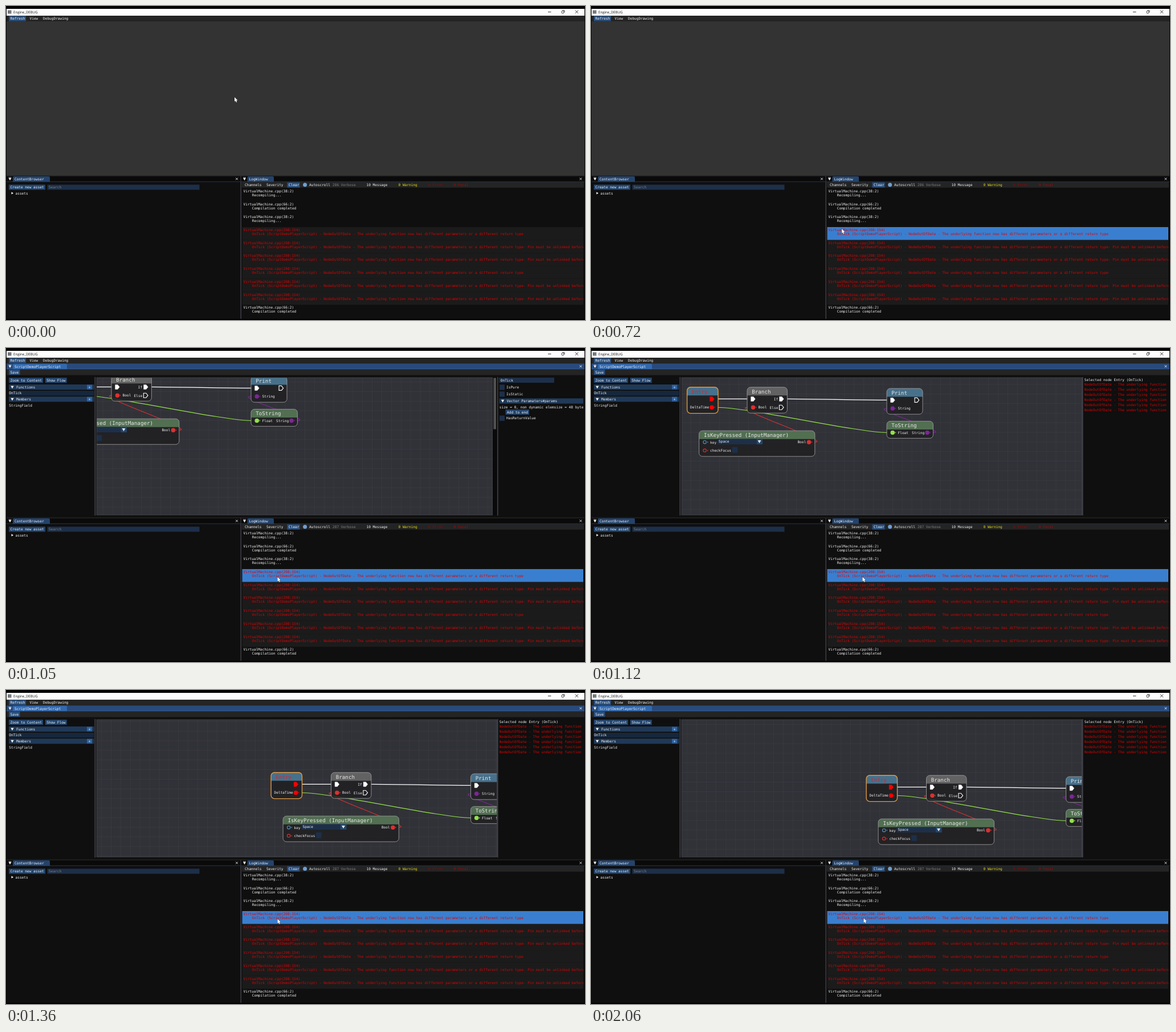
Recreate the animation shown at these times as an HTML page with a canvas. Size 1016 px wide and 551 px high, loop 2.29 s.

```html
<!DOCTYPE html>
<html lang="en">
<head>
<meta charset="utf-8">
<title>Engine_DEBUG</title>
<style>
  html, body { margin: 0; width: 100%; height: 100%; overflow: hidden; background: #000; }
  canvas { display: block; }
</style>
</head>
<body>
<canvas id="stage" width="1016" height="551"></canvas>
<script>
const c = document.getElementById('stage').getContext('2d');
const LOOP = 2290, OPEN = 1050, PRESS = 890, SELECT = 1120;

const col = {
  bg: '#0f0f0f', bar: '#242424', text: '#f4f4f4', dim: '#808080', red: '#e00000',
  button: '#23456d', header: '#1f3958', frame: '#1d2f49', title: '#294a7a',
  tab: '#3369ad', tabDim: '#23436c', line: '#3e3e47',
  flow: '#ffffff', bool: '#dc3030', float: '#93e24a', string: '#7c2696', key: '#4f8fc0'
};

// [time, x, y], held until the next entry
const pointer = [
  [0, 401, 160], [70, 390, 168], [130, 362, 192], [200, 326, 232], [260, 302, 272],
  [330, 294, 310], [390, 312, 340], [460, 352, 361], [520, 386, 371], [600, 412, 380],
  [670, 440, 391], [750, 461, 398], [820, 472, 401], [890, 476.5, 401.7],
  [1980, 477.5, 401], [2060, 478.5, 400.6]
];
const pan = [
  [1050, -220, -55], [1120, -131, -34], [1200, 0, 0], [1280, 104, 26.5],
  [1360, 165.5, 42], [1430, 182, 46.5], [1510, 183.5, 47]
];
const at = (steps, t) => steps.filter(s => s[0] <= t).pop();

function rect(x0, y0, x1, y1, fill) {
  c.fillStyle = fill;
  c.fillRect(x0, y0, x1 - x0, y1 - y0);
}
function round(x0, y0, x1, y1, r) {
  c.beginPath();
  c.roundRect(x0, y0, x1 - x0, y1 - y0, r);
}
function poly(points, fill, stroke, width = 1) {
  c.beginPath();
  points.forEach(([x, y]) => c.lineTo(x, y));
  c.closePath();
  if (fill) { c.fillStyle = fill; c.fill(); }
  if (stroke) { c.strokeStyle = stroke; c.lineWidth = width; c.stroke(); }
}
function stroke(points, color, width = 1) {
  c.beginPath();
  points.forEach(([x, y], i) => i % 2 ? c.lineTo(x, y) : c.moveTo(x, y));
  c.strokeStyle = color;
  c.lineWidth = width;
  c.stroke();
}
function dot(x, y, r, fill, line) {
  c.beginPath();
  c.arc(x, y, r, 0, 7);
  if (fill) { c.fillStyle = fill; c.fill(); }
  if (line) { c.strokeStyle = line; c.lineWidth = 1.1; c.stroke(); }
}
// y is the middle of the capitals
function text(s, x, y, color = col.text, size = 6.13, font = '"DejaVu Sans Mono", monospace') {
  c.save();
  c.translate(x, y + size * 0.36);
  c.scale(size / 100, size / 100);
  c.font = '100px ' + font;
  c.textRendering = 'geometricPrecision';
  c.fillStyle = color;
  c.fillText(s, 0, 0);
  c.restore();
}
function clip(x0, y0, x1, y1, draw) {
  c.save();
  c.beginPath();
  c.rect(x0, y0, x1 - x0, y1 - y0);
  c.clip();
  draw();
  c.restore();
}
const down = (x, y, r = 2.7) => poly([[x - r, y - r * .8], [x + r, y - r * .8], [x, y + r]], col.text);
const cross = (x, y, r, color) => stroke([[x - r, y - r], [x + r, y + r], [x + r, y - r], [x - r, y + r]], color, .9);

function button(s, x0, x1, y, fill = col.button) {
  rect(x0, y - 4.5, x1, y + 4.5, fill);
  text(s, x0 + 2.5, y);
}
function check(s, y) {
  rect(866, y - 4.7, 875, y + 4.6, col.frame);
  text(s, 878, y);
}
function fold(s, x0, x1, y) {
  rect(x0, y - 4.6, x1, y + 4.6, col.header);
  down(x0 + 6, y);
  text(s, x0 + 13, y);
}
function titleBar(s, x0, x1, y, tabEnd, active) {
  const tab = active ? col.tab : col.tabDim;
  rect(x0, y - 5, x1, y + 5, active ? col.title : '#0a0a0a');
  c.fillStyle = tab;
  round(x0 + 11, y - 4.5, tabEnd, y + 5, [2, 2, 0, 0]);
  c.fill();
  rect(x0, y + 4.4, x1, y + 5.2, tab);
  rect(x0 + 3.6, y - 2.7, x0 + 8.4, y - 1.9, col.text);
  down(x0 + 6, y + .5, 2.4);
  text(s, x0 + 14, y + .3);
  cross(x1 - 6.5, y, 1.9, col.text);
}

function windowFrame() {
  rect(0, 0, 1016, 551, '#000');
  rect(1, 5, 1015, 17, '#fdfdfd');
  rect(3, 7.5, 9.5, 13.5, '#77797d');
  text('Engine_DEBUG', 13, 10.8, '#111', 6.1, '"Open Sans", sans-serif');
  stroke([[951, 10.5], [956.5, 10.5]], '#222', .9);
  c.strokeStyle = '#222';
  c.lineWidth = .8;
  round(975, 8.8, 978.8, 12.6, .8);
  c.stroke();
  c.beginPath();
  c.moveTo(976.3, 7.8);
  c.lineTo(980, 7.8);
  c.lineTo(980, 11.4);
  c.stroke();
  cross(1001.5, 10.2, 2.6, '#222');
  rect(1, 17, 1015, 27, col.bar);
  button('Refresh', 5, 35, 22, '#2a4f7c');
  text('View', 41.5, 22);
  text('DebugDrawing', 65, 22);
  rect(1, 27, 1015, 297.5, '#333');
  rect(1, 297.5, 1015, 549, col.line);
}

function contentBrowser() {
  rect(1, 308, 411.5, 549, col.bg);
  titleBar('ContentBrowser', 1, 411.5, 303.4, 77, false);
  button('Create new asset', 5, 69, 318);
  rect(72.5, 313.5, 339.5, 322.5, col.frame);
  text('Search', 75, 318, col.dim);
  poly([[9.5, 326.3], [13, 328.4], [9.5, 330.6]], col.text);
  text('assets', 16.5, 328.6);
}

function log(t, mx, my) {
  const pressed = t >= PRESS && t < OPEN;
  const pitch = 22.72, top = 319.8;
  rect(413, 308, 1015, 549, col.bg);
  titleBar('LogWindow', 412.5, 1015, 303.4, 470, pressed);
  rect(414, 309, 1014, 318.7, col.bar);
  text('Channels', 419, 314);
  text('Severity', 457, 314);
  button('Clear', 493.5, 515.5, 314, '#2a4f7c');
  dot(524.6, 313.8, 3.5, '#6f9fd2');
  text('Autoscroll', 532, 314);
  text((t < OPEN ? 286 : 287) + ' Verbose', 573, 314, col.dim);
  text('10 Message', 632.5, 314);
  text('0 Warning', 688.5, 314, '#e8e000');
  text('6 Error', 741, 314, '#a00000');
  text('0 Fatal', 785.5, 314, '#b80000');

  const build = ['(38:2)', 'Recompiling...'], done = ['(66:2)', 'Compilation completed'];
  const fault = 'OnTick (ScriptDemoPlayerScript) - NodeOutOfDate - The underlying function now has different parameters or a different return type';
  const short = ['(208:154)', fault, 1], long = ['(208:154)', fault + '- Pin must be unlinked before', 1];
  const hover = mx > 414 ? Math.floor((my - top) / pitch) : -1;
  clip(414.5, 319, 1013, 549, () => {
    [build, done, build, short, long, long, short, long, long, done].forEach(([place, note, bad], i) => {
      const y = top + i * pitch, ink = bad ? col.red : col.text;
      if (bad) rect(414, y, 1013, y + pitch, '#1b1b1b');
      if (i === hover) rect(414, y, 1013, y + pitch, pressed ? '#4296fa' : '#3a7fcf');
      text('VirtualMachine.cpp' + place, 416.5, y + 4.8, ink);
      text(note, 431.8, y + 11.8, ink);
    });
  });
}

function link(x0, y0, x1, y1, k, color, width = 1.1) {
  c.beginPath();
  c.moveTo(x0, y0);
  c.bezierCurveTo(x0 + k, y0, x1 - k, y1, x1, y1);
  c.strokeStyle = color;
  c.lineWidth = width;
  c.stroke();
}
function node(title, x0, y0, x1, y1, tint, edge = '#9a9a9a', ink = '#e6e6e6') {
  round(x0, y0, x1, y1, 6);
  c.fillStyle = 'rgba(32,32,34,.86)';
  c.fill();
  round(x0, y0, x1, y0 + 14.5, [6, 6, 0, 0]);
  c.fillStyle = tint;
  c.fill();
  round(x0, y0, x1, y1, 6);
  c.strokeStyle = edge;
  c.lineWidth = edge === '#9a9a9a' ? .9 : 1.4;
  c.stroke();
  text(title, x0 + 8.3, y0 + 7.4, ink, 9.17);
}
function flow(x, y, fill, edge = fill) {
  poly([[x - 3.6, y - 4], [x + .8, y - 4], [x + 4, y], [x + .8, y + 4], [x - 3.6, y + 4]], fill, edge, fill ? .4 : 1.1);
}
function pin(x, y, color, filled = true) {
  dot(x, y, filled ? 3.2 : 2.7, filled ? color : null, color);
  poly([[x + 4.4, y - 1.4], [x + 6.2, y], [x + 4.4, y + 1.4]], color);
}

function graph(dx, dy, right) {
  rect(159, 52, right, 293, '#313238');
  clip(159, 52, right, 293, () => {
    const step = 16.87;
    for (let x = 159 + (dx + 990) % step; x < right; x += step) rect(x, 52, x + .8, 293, 'rgba(130,130,130,.11)');
    for (let y = 52 + (dy + 990) % step; y < 293; y += step) rect(159, y, right, y + .8, 'rgba(130,130,130,.11)');
    c.translate(dx, dy);

    link(354, 123.4, 406, 123.4, 10, col.flow, 1.4);
    link(475, 123.4, 651, 125.4, 50, col.flow, 1.4);
    link(354, 138.2, 651, 182.5, 52, col.float);
    link(524, 199, 405, 138.2, 31, col.bool);
    link(731, 182.5, 650, 140, 32, col.string);

    const blue = '#47718b', green = '#526f52';
    node('Entry', 299.6, 102.8, 354, 148.6, blue, '#e09a42', '#e02030');
    flow(343.2, 123.4, '#ff0000');
    text('DeltaTime', 305, 138.2);
    pin(343, 138.2, '#ff0000');

    node('Branch', 405, 102.8, 475.4, 148.2, '#626262');
    flow(415.2, 123.4, col.flow);
    text('If', 451.8, 123.6);
    flow(465.2, 123.4, col.flow);
    pin(415.4, 138.2, col.bool);
    text('Bool', 424.6, 138.2);
    text('Else', 444.6, 138.4);
    flow(465, 138.2, null, col.flow);

    node('Print', 650, 105, 713, 150.2, blue);
    flow(660.2, 125.4, col.flow);
    flow(702.6, 125.4, null, col.flow);
    pin(660.2, 140, col.string);
    text('String', 669.5, 140.2);

    node('ToString', 650, 162.4, 731.4, 192.4, green);
    pin(660.2, 182.4, col.float);
    text('Float', 669.5, 182.5);
    text('String', 694, 182.5);
    pin(721, 182.4, col.string);

    node('IsKeyPressed (InputManager)', 320.6, 179.2, 523.8, 224.2, green);
    pin(330.6, 199.2, col.key, false);
    text('key', 340, 199.4);
    rect(353, 193.4, 421.5, 203, col.frame);
    rect(421.5, 193.4, 432, 203, '#23456d');
    down(426.5, 198.2, 2.9);
    text('Space', 355, 198.2);
    text('Bool', 493.4, 199.2);
    pin(513.4, 199.2, col.bool);
    pin(330.6, 213.8, col.bool, false);
    text('checkFocus', 340, 214);
    rect(378.4, 208, 388.2, 217.8, col.frame);
  });
  c.strokeStyle = '#55555c';
  c.lineWidth = .6;
  c.strokeRect(159, 52, right - 159, 241);
}

function functionPanel() {
  rect(865, 52, 962, 61, col.frame);
  text('OnTick', 867.8, 56.6);
  check('IsPure', 69);
  check('IsStatic', 81);
  fold('Vector Paramaters#params', 865.5, 1013, 93);
  text('size = 0, non dynamic elemsize = 48 byte', 865.8, 103.6);
  button('Add to end', 876.5, 918, 112.5);
  check('HasReturnValue', 123.2);
  rect(854, 51, 861, 294, '#0a0a0a');
  rect(855.3, 52.5, 860, 142.5, '#4f4f4f');
}
function nodePanel() {
  text('Selected node Entry (OnTick)', 865.8, 55.4);
  for (let i = 0; i < 6; i++) text('NodeOutOfDate - The underlying function', 865.8, 64.2 + i * 9, col.red);
}

function scriptEditor(t) {
  const [, dx, dy] = at(pan, t), selected = t >= SELECT;
  rect(1, 27, 1015, 297.5, col.bg);
  titleBar('ScriptDemoPlayerScript', 1, 1015, 32.2, 107, true);
  rect(1, 37.6, 1015, 47.6, col.bar);
  button('Save', 5, 24.5, 42.5, '#2a4f7c');
  button('Zoom to Content', 5, 65, 56.6);
  button('Show Flow', 68.8, 106.8, 56.6);
  [['Functions', 68.6], ['Members', 89.8]].forEach(([name, y]) => {
    fold(name, 5, 154.5, y);
    rect(142, y - 4, 151, y + 4, '#2f629f');
    text('+', 144.7, y);
  });
  rect(5, 75, 154.5, 83.6, '#16273c');
  text('OnTick', 5.3, 79.2);
  text('StringField', 5.3, 100.4);
  rect(155.4, 51, 157.2, 294, col.line);
  rect(862, 51, 863.6, 294, col.line);
  graph(dx, dy, selected ? 861.5 : 853.8);
  clip(854, 48, 1013.5, 297, selected ? nodePanel : functionPanel);
}

function mouse(t, x, y) {
  if (t >= PRESS && t < OPEN) dot(x + .3, y + .8, 7, 'rgba(222,214,70,.62)');
  const shape = [[0, 0], [0, 7.8], [1.8, 6.2], [3, 9], [4.3, 8.4], [3.1, 5.8], [5.5, 5.5]];
  poly(shape.map(([px, py]) => [x + px, y + py]), '#fff', '#111', .7);
  poly(shape.map(([px, py]) => [x + px, y + py]), '#fff');
}

function draw(t) {
  const [, x, y] = at(pointer, t);
  windowFrame();
  if (t >= OPEN) scriptEditor(t);
  contentBrowser();
  log(t, x, y);
  mouse(t, x, y);
}

const start = performance.now();
function tick() {
  draw((performance.now() - start) % LOOP);
  requestAnimationFrame(tick);
}
tick();
</script>
</body>
</html>
```
